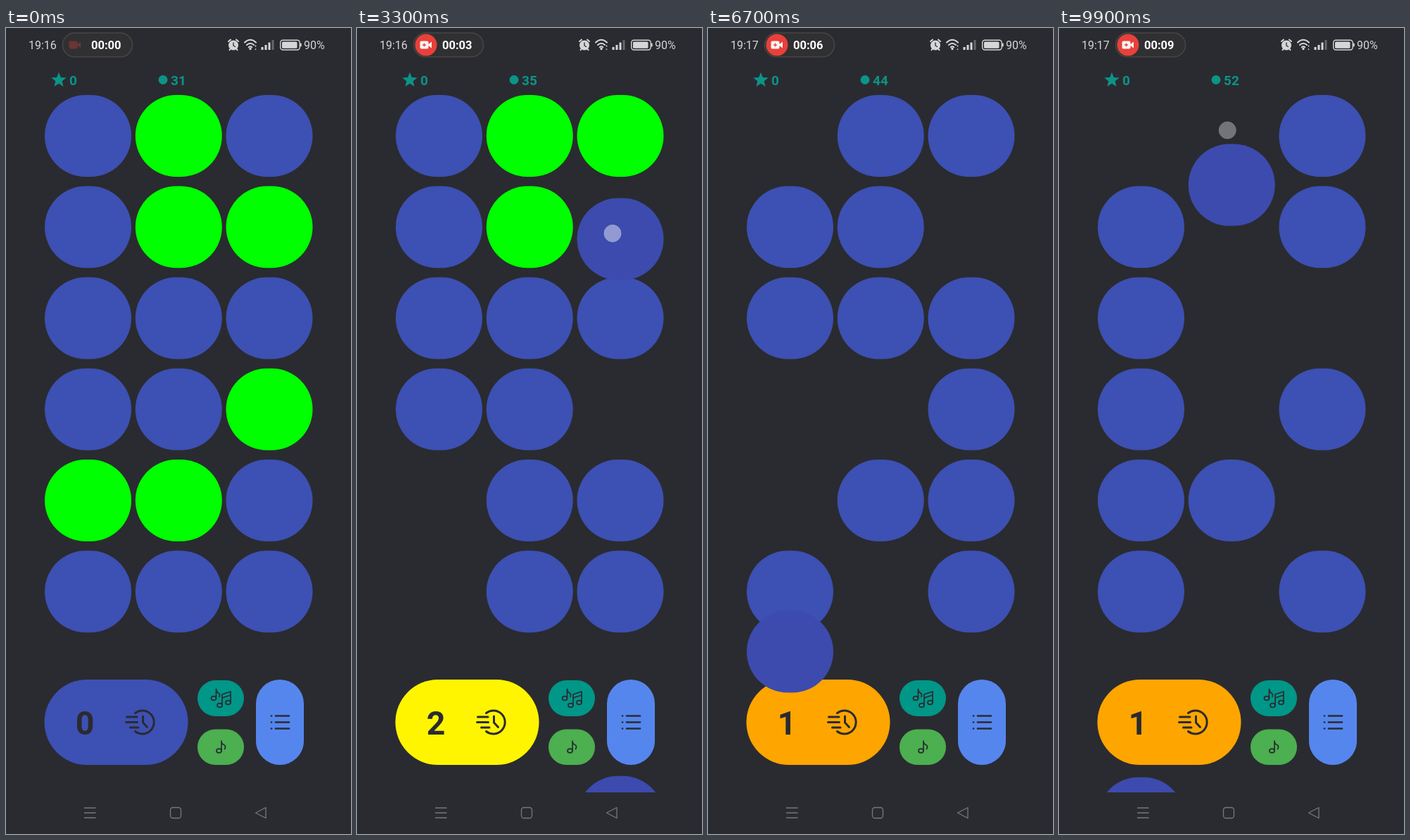
Recreate the animation shown at these times as an HTML page. Size 490 by 1143 pixels, loop 10000 ms.

```html
<!DOCTYPE html>
<html lang="en">
<head>
<meta charset="utf-8">
<title>Tap the lights</title>
<style>
  html, body { margin: 0; width: 100%; height: 100%; overflow: hidden; background: #2a2b30; }
  svg { display: block; width: 490px; height: 1143px; font-family: Roboto, sans-serif; }
  .status { fill: #d6d6d8; font-size: 16px; }
  .bold { font-weight: 700; }
  .teal { fill: #0b9488; }
  .line { fill: none; stroke: #2a2b30; stroke-linecap: round; stroke-linejoin: round; }
  .nav { fill: none; stroke: #77787c; stroke-width: 1.3; }
</style>
</head>
<body>
<svg viewBox="0 0 490 1143">
  <defs>
    <clipPath id="app"><rect width="490" height="1084"/></clipPath>
    <radialGradient id="shade">
      <stop offset="0" stop-color="#000" stop-opacity=".11"/>
      <stop offset=".65" stop-color="#000" stop-opacity=".09"/>
      <stop offset="1" stop-color="#000" stop-opacity="0"/>
    </radialGradient>
    <path id="camera" d="M91.500 18.500h8a2 2 0 0 1 2 2v2.500l4.500-3.500v9l-4.500-3.500v2.500a2 2 0 0 1-2 2h-8a2 2 0 0 1-2-2v-7a2 2 0 0 1 2-2z"/>
  </defs>
  <rect width="490" height="1143" fill="#2a2b30"/>

  <!-- status bar -->
  <text id="clock" class="status" x="32" y="30"></text>
  <rect x="80.500" y="7" width="99" height="34" rx="17" fill="#303032" stroke="#474646" stroke-width="1.500"/>
  <use href="#camera" fill="#6b3436"/>
  <g id="recorder">
    <circle cx="98" cy="24" r="15.500" fill="#e8403a"/>
    <use href="#camera" fill="#fff" opacity=".94"/>
    <path d="M95.500 21.500v5M93 24h5" stroke="#e8403a" stroke-width="1.300"/>
  </g>
  <text id="timer" class="bold" x="121" y="30" font-size="16.500" fill="#fff"></text>
  <g fill="none" stroke="#d6d6d8" stroke-width="2" stroke-linecap="round">
    <circle cx="323" cy="24.500" r="6" fill="#d6d6d8"/>
    <path d="M316 19l3-2.500M330 19l-3-2.500M318.500 30l-1 1.200M327.500 30l1 1.200"/>
    <path d="M323 21v4l2.500 1.500" stroke="#2a2b30" stroke-width="1.300"/>
    <path d="M339 20.500q8-7.500 16 0M342 24q5-4.500 10 0M344.800 27.300q2.200-2 4.400 0"/>
    <path d="M354.500 25v1M354.500 30v.500" stroke-width="1.500"/>
  </g>
  <g fill="#d6d6d8">
    <circle cx="347" cy="29.500" r="1.700"/>
    <path d="M362.500 27h3v4h-3zM367.500 24h3v7h-3zM372.500 20.500h3v10.500h-3z"/>
    <path d="M377.500 17h3v14h-3z" opacity=".35"/>
    <rect x="389.700" y="17.200" width="27.500" height="13.800" rx="3.500" fill="none" stroke="#d6d6d8" stroke-width="1.400"/>
    <rect x="392" y="19.500" width="21.500" height="9.200" rx="1.500"/>
    <rect x="418" y="21.500" width="1.700" height="5" rx=".8"/>
  </g>
  <text class="status" x="423" y="30">90%</text>

  <!-- score row -->
  <path id="star" class="teal"/>
  <text class="teal bold" x="90" y="80.500" font-size="19">0</text>
  <circle class="teal" cx="223" cy="73.500" r="6.500"/>
  <text id="score" class="teal bold" x="234" y="80.500" font-size="19"></text>

  <g id="still"></g>

  <!-- controls -->
  <g id="button">
    <rect id="face" x="54.500" y="924" width="204" height="121" rx="60.500"/>
    <rect id="press" x="54.500" y="924" width="204" height="121" rx="60.500" fill="url(#shade)"/>
    <text id="count" class="bold" x="112" y="1002" font-size="46.500" text-anchor="middle" fill="#2a2b30"></text>
    <path class="line" stroke-width="3" d="M183.500 971.500a16.500 16.500 0 1 1 0 26M171.500 977h14.500M170.500 984.500h16M176.500 992h11.500M194.500 976v9l6 6.500"/>
  </g>
  <rect x="272" y="925" width="66" height="51" rx="25.500" fill="#009688"/>
  <g class="line" stroke-width="1.700">
    <ellipse cx="295" cy="950.500" rx="3.500" ry="2.900"/>
    <path d="M298.500 950.500v-13q0 4 3 5.500t1.500 5.500"/>
    <ellipse cx="303.500" cy="960.500" rx="3.500" ry="2.900"/>
    <ellipse cx="315.500" cy="956.500" rx="3.500" ry="2.900"/>
    <path d="M307 960.500v-15.500l12-4v15.500M307 950l12-4"/>
  </g>
  <rect x="272" y="994.500" width="66" height="50.500" rx="25.200" fill="#4caf50"/>
  <g class="line" stroke-width="1.700">
    <ellipse cx="302.500" cy="1025" rx="3.500" ry="2.900"/>
    <path d="M306 1025v-14q0 4 3.500 5.500t1 6"/>
  </g>
  <rect x="355" y="924" width="68" height="121" rx="34" fill="#5586ee"/>
  <path class="line" stroke-width="2.700" d="M377 975.500h.1M377 984.500h.1M377 993.500h.1M383 975.500h19M383 984.500h19M383 993.500h19"/>

  <g id="falling" clip-path="url(#app)"></g>

  <g class="nav">
    <path d="M111 1106h16.500M111 1113h16.500M111 1120h16.500"/>
    <rect x="233.500" y="1105.500" width="15" height="15" rx="3.500"/>
    <path d="M354.500 1113l14.500-7.500v15z" stroke-linejoin="round"/>
  </g>
  <g id="touches"></g>
</svg>
<script>
const LOOP = 10000, STEP = 100;
const BLUE = '#3d50b3', FALL_BLUE = '#3c4bad', GREEN = '#00ff00';
const COUNT_COLORS = [BLUE, '#ffa500', '#fff500', '#a4ff00'];
const COLS = 3, ROWS = 6, FLOOR = 1084;
const GRAVITY = 1143 / 450 ** 2;   // px per ms squared
const LEAD = 80;                   // finger is down this long before the tap counts

// Each lit tile: tap time, column, row, touch offset x, y, score delay
const DEALS = [
  { at: 0, lit: [[1, 0], [1, 1], [2, 1], [2, 3], [0, 4], [1, 4]].map(p => [Infinity, ...p]) },
  { at: 2150, press: 2070, lit: [
    [2450, 0, 5], [2720, 0, 4], [2980, 2, 3], [3245, 2, 1, -11, 9],
    [3470, 1, 1], [3690, 1, 0], [3900, 2, 0]] },
  { at: 4500, press: 4420, lit: [
    [4980, 0, 4], [5250, 1, 5], [5558, 1, 3, 20, -8, 300],
    [5830, 0, 3, -13, -17], [6090, 2, 1], [6340, 0, 0]] },
  { at: 7350, press: 7270, lit: [
    [7750, 1, 5], [8040, 2, 4], [8330, 1, 3], [8620, 2, 2],
    [8910, 1, 2], [9200, 1, 1], [9486, 0, 0], [9789, 1, 0, -6, -8]] }
];

const $ = id => document.getElementById(id);
const tileX = c => 116.5 + 128.75 * c;
const tileY = r => 153 + 129.25 * r;

function add(parent, tag, attrs) {
  const el = document.createElementNS('http://www.w3.org/2000/svg', tag);
  for (const k in attrs) el.setAttribute(k, attrs[k]);
  parent.append(el);
  return el;
}

const tiles = [];
for (let r = 0; r < ROWS; r++)
  for (let c = 0; c < COLS; c++)
    tiles.push({ c, r, el: add($('still'), 'rect', {
      x: tileX(c) - 61.5, y: tileY(r) - 58, width: 123, height: 116, rx: 58 }) });

const touches = [];
function addTouch(time, x, y) {
  const el = add($('touches'), 'circle', {
    cx: x, cy: y, r: 12, fill: '#fff', 'fill-opacity': .92, stroke: '#fff' });
  touches.push({ time, el });
}
for (const deal of DEALS) {
  if (!deal.press) continue;
  addTouch(deal.press, 212, 994);
  for (const [time, c, r, dx = -8, dy = -6] of deal.lit)
    addTouch(time, tileX(c) + dx, tileY(r) + dy);
}

const starPoints = Array.from({ length: 10 }, (_, i) => {
  const a = i * Math.PI / 5 - Math.PI / 2, d = i % 2 ? 4.8 : 11.3;
  return (75 + d * Math.cos(a)).toFixed(1) + ' ' + (74 + d * Math.sin(a)).toFixed(1);
});
$('star').setAttribute('d', 'M' + starPoints.join('L') + 'z');
for (const [k, v] of Object.entries({ gradientUnits: 'userSpaceOnUse', cx: 187, cy: 985, r: 82 }))
  document.querySelector('#shade').setAttribute(k, v);

function touchAlpha(age) {
  if (age < -LEAD) return 0;
  return .5 * Math.max(0, Math.min(1, (315 - age) / 275));
}

function drawTiles(deal, t) {
  for (const { c, r, el } of tiles) {
    const lit = deal.lit.find(p => p[1] === c && p[2] === r);
    const age = lit ? t - lit[0] : -1;
    const falling = age >= 0;
    const drop = falling ? GRAVITY * age * age : 0;
    const layer = $(falling ? 'falling' : 'still');
    if (el.parentNode !== layer) layer.append(el);
    el.setAttribute('transform', `translate(0 ${drop})`);
    el.setAttribute('fill', falling ? FALL_BLUE : lit ? GREEN : BLUE);
    el.setAttribute('display', tileY(r) - 58 + drop > FLOOR ? 'none' : 'inline');
  }
}

function drawButton(deal, t) {
  const age = t - deal.at;
  const count = deal.press ? Math.max(0, 3 - Math.floor(age / 1000)) : 0;
  const shake = deal.press && age < 400 ? 13 * Math.sin(age * Math.PI / 100) : 0;
  const pressed = DEALS.some(d => Math.abs(t - d.press) <= LEAD);
  $('button').setAttribute('transform', `translate(${shake.toFixed(2)} 0)`);
  $('face').setAttribute('fill', COUNT_COLORS[count]);
  $('press').setAttribute('opacity', pressed ? 1 : 0);
  $('count').textContent = count;
}

function draw(t) {
  const deal = DEALS.filter(d => d.at <= t).pop();
  drawTiles(deal, t);
  drawButton(deal, t);
  for (const { time, el } of touches) el.setAttribute('opacity', touchAlpha(t - time));
  const hits = DEALS.flatMap(d => d.lit).filter(p => p[0] + (p[5] || 0) <= t).length;
  $('score').textContent = 31 + hits;
  $('clock').textContent = t < 6500 ? '19:16' : '19:17';
  $('timer').textContent = '00:0' + Math.floor(t / 1000);
  $('recorder').setAttribute('opacity', Math.min(1, t / 300));
}

const start = performance.now();
function tick() {
  const t = (performance.now() - start) % LOOP;
  draw(Math.floor(t / STEP) * STEP);
  requestAnimationFrame(tick);
}
tick();
</script>
</body>
</html>
```
